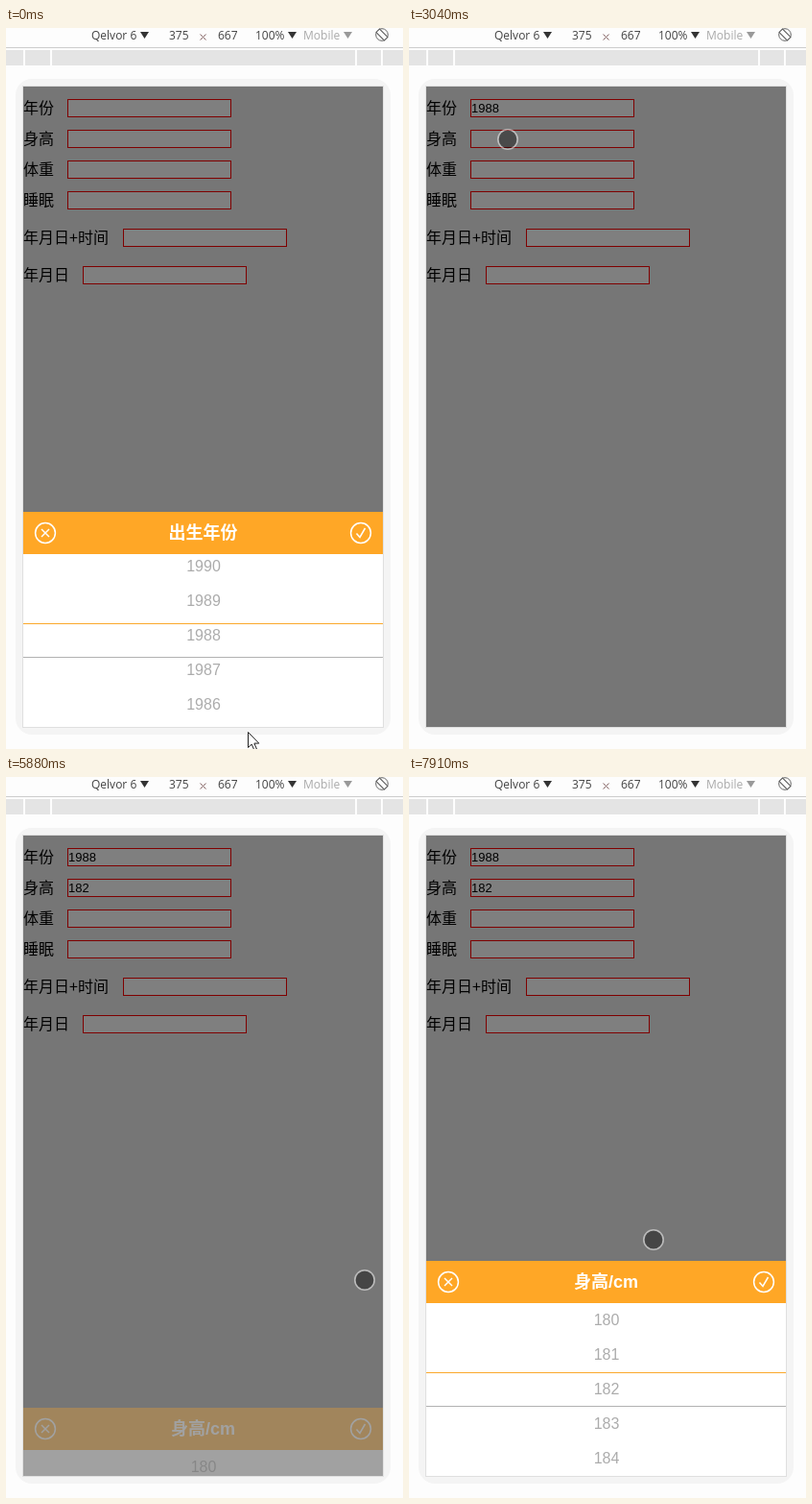
These frames come from a looping animation (414 by 751 pixels, 8 s). An HTML page with a canvas:

```html
<!DOCTYPE html>
<html lang="zh">
<head>
<meta charset="utf-8">
<style>
html, body { margin: 0; width: 100%; height: 100%; overflow: hidden; background: #fdfdfd; }
canvas { display: block; }
</style>
</head>
<body>
<canvas id="stage" width="414" height="751"></canvas>
<script>
const LOOP = 8000;
const stage = document.getElementById('stage').getContext('2d');
const sheetCanvas = document.createElement('canvas');
sheetCanvas.width = 375;
sheetCanvas.height = 224;
const sheet = sheetCanvas.getContext('2d');

const SCREEN = { x: 18, y: 61, w: 375, h: 667 };
const CJK = '"Noto Sans CJK SC", "Noto Sans CJK", sans-serif';
const ARIAL = '"Liberation Sans", "Noto Sans CJK SC", "Noto Sans CJK", sans-serif';
const UI = '"Open Sans", "Noto Sans", sans-serif';

// The picture is held between redraws: [first, last, count]
const BURSTS = [
  [0, 0, 1], [150, 1110, 8], [1230, 1230, 1], [1540, 1660, 2], [1940, 2600, 6],
  [2910, 3870, 8], [4020, 4920, 7], [5070, 6000, 8], [6160, 7000, 7], [7400, 7910, 5]
];
const TICKS = BURSTS.flatMap(([a, b, n]) =>
  Array.from({ length: n }, (_, i) => n > 1 ? Math.round(a + (b - a) * i / (n - 1)) : a));

const POINTER = [
  [0, 252, 733], [420, 292, 676], [830, 362, 575], [1110, 394, 530], [1230, 382, 530],
  [1540, 374, 525], [1660, 373, 524], [1940, 373, 524], [2330, 190, 240], [2600, 103, 116],
  [3180, 103, 116], [3500, 215, 440], [3870, 258, 582], [4320, 260, 590], [4920, 257, 581],
  [5070, 270, 572], [5470, 365, 528], [5600, 374, 524], [6000, 374, 524], [6440, 245, 300],
  [6720, 112, 110], [7000, 108, 121], [7527, 108, 121], [7910, 255, 482]
];
const WHEEL = [[0, -5], [150, -4], [420, 0], [3870, 0], [4320, 8], [4920, -1], [5200, 0]];
const SHOWN = [
  [0, 1], [1800, 1], [1940, 0.75], [2072, 0.25], [2204, 0], [2910, 0], [3040, 0.07],
  [3184, 0.6], [3321, 0.95], [3400, 1], [5660, 1], [5734, 0.9], [5873, 0.29], [6000, 0],
  [7400, 0], [7527, 0.07], [7655, 0.6], [7782, 0.97], [7850, 1]
];

const FIELDS = [
  ['年份', 64, 74], ['身高', 64, 106], ['体重', 64, 138], ['睡眠', 64, 170],
  ['年月日+时间', 122, 209], ['年月日', 80, 248]
];

function track(keys, t, col = 1) {
  const i = keys.findIndex(k => k[0] > t);
  if (i < 0) return keys[keys.length - 1][col];
  const a = keys[i - 1], b = keys[i];
  return a[col] + (b[col] - a[col]) * (t - a[0]) / (b[0] - a[0]);
}

function rect(c, color, x, y, w, h) {
  c.fillStyle = color;
  c.fillRect(x, y, w, h);
}

function text(c, str, x, y, font, color, align = 'left') {
  c.font = font;
  c.fillStyle = color;
  c.textAlign = align;
  c.fillText(str, x, y);
}

function line(c, points, color, width) {
  c.beginPath();
  points.forEach(([x, y]) => c.lineTo(x, y));
  c.strokeStyle = color;
  c.lineWidth = width;
  c.stroke();
}

function ring(c, x, y, r, color, width) {
  c.beginPath();
  c.arc(x, y, r, 0, Math.PI * 2);
  c.strokeStyle = color;
  c.lineWidth = width;
  c.stroke();
}

function polygon(c, points, color) {
  c.beginPath();
  points.forEach(([x, y]) => c.lineTo(x, y));
  c.closePath();
  c.fillStyle = color;
  c.fill();
}

const caret = (x, color) => polygon(stage, [[x, 4], [x + 9, 4], [x + 4.5, 11]], color);

function drawToolbar() {
  rect(stage, '#fdfdfd', 0, 0, 414, 751);
  const font = '12px ' + UI;
  text(stage, 'Qelvor 6', 89, 12, font, '#444');
  text(stage, '375', 170, 12, font, '#444');
  text(stage, '667', 221, 12, font, '#444');
  text(stage, '100%', 260, 12, font, '#444');
  text(stage, 'Mobile', 310, 12, font, '#aaa');
  line(stage, [[202.5, 6.5], [208.5, 12.5]], '#856565', 1);
  line(stage, [[208.5, 6.5], [202.5, 12.5]], '#856565', 1);
  caret(140, '#333');
  caret(294, '#333');
  caret(352, '#999');

  ring(stage, 392, 7, 6.3, '#666', 1);
  stage.save();
  stage.translate(392, 7);
  stage.rotate(-Math.PI / 4);
  rect(stage, '#fdfdfd', -3, -7, 6, 14);
  stage.strokeStyle = '#555';
  stage.lineWidth = 1;
  stage.strokeRect(-2.5, -6, 5, 12);
  stage.restore();

  rect(stage, '#cdcdcd', 0, 20, 414, 1);
  [[0, 18], [20, 46], [48, 364], [366, 391], [393, 414]]
    .forEach(([a, b]) => rect(stage, '#e4e4e4', a, 23, b - a, 16));
}

function drawPage(t) {
  stage.beginPath();
  stage.roundRect(10, 53, 391, 683, 17);
  stage.fillStyle = '#f4f4f4';
  stage.fill();
  rect(stage, '#dfdfdf', 17, 60, 377, 669);
  rect(stage, '#eee', SCREEN.x, SCREEN.y, SCREEN.w, SCREEN.h);

  FIELDS.forEach(([label, x, y]) => {
    text(stage, label, 18, y + 15, '16px ' + CJK, '#000');
    rect(stage, '#f00', x, y, 171, 19);
    rect(stage, '#fff', x + 1, y + 1, 169, 17);
  });
  if (t >= 1940) text(stage, '1988', 65, 88, '13px ' + ARIAL, '#000');
  if (t >= 5734) text(stage, '182', 65, 120, '13px ' + ARIAL, '#000');
}

function drawSheet(t) {
  const years = t < 2700;
  const title = years ? '出生年份' : '身高/cm';
  const offset = track(WHEEL, t);
  rect(sheet, '#fff', 0, 0, 375, 224);
  for (let row = -1; row <= 5; row++) {
    const value = years ? 1990 - row : 180 + row;
    text(sheet, value, 188, 67 + row * 36 + offset, '16px ' + ARIAL, '#acacac', 'center');
  }
  rect(sheet, '#ffa726', 0, 0, 375, 44);
  text(sheet, title, 187.5, 28, 'bold 18px ' + ARIAL, '#fff', 'center');
  rect(sheet, '#fba92c', 0, 116, 375, 1);
  rect(sheet, '#b2b2b2', 0, 151, 375, 1);

  ring(sheet, 23, 22, 10.4, '#fff', 1.5);
  line(sheet, [[19, 18], [27, 26]], '#fff', 1.5);
  line(sheet, [[27, 18], [19, 26]], '#fff', 1.5);
  ring(sheet, 352, 22, 10.4, '#fff', 1.5);
  line(sheet, [[347.5, 22.5], [351, 26.5], [356.5, 17]], '#fff', 1.5);
}

function drawPicker(t) {
  const open = t < 2204 || (t >= 2910 && t < 6000) || t >= 7400;
  if (!open) return;
  const shown = track(SHOWN, t);
  drawSheet(t);
  stage.save();
  stage.beginPath();
  stage.rect(SCREEN.x, SCREEN.y, SCREEN.w, SCREEN.h);
  stage.clip();
  rect(stage, 'rgba(0,0,0,.5)', SCREEN.x, SCREEN.y, SCREEN.w, SCREEN.h);
  stage.globalAlpha = shown;
  stage.drawImage(sheetCanvas, SCREEN.x, Math.round(504 + 224 * (1 - shown)));
  stage.restore();
}

function drawPointer(t) {
  const x = Math.round(track(POINTER, t, 1));
  const y = Math.round(track(POINTER, t, 2));
  if (x > 393 || y > 728) {
    const shape = [[0, 0], [0, 16], [3.7, 12.6], [6.3, 18.5], [8.9, 17.4], [6.4, 11.6], [11.3, 11.6]]
      .map(([dx, dy]) => [x + 0.5 + dx, y + 0.5 + dy]);
    polygon(stage, shape, '#fff');
    line(stage, [...shape, shape[0]], '#222', 1);
    return;
  }
  stage.beginPath();
  stage.arc(x, y, 9.5, 0, Math.PI * 2);
  stage.fillStyle = 'rgba(0,0,0,.41)';
  stage.fill();
  ring(stage, x, y, 10.2, 'rgba(255,255,255,.5)', 1.6);
}

function draw(now) {
  const time = now % LOOP;
  const t = TICKS.filter(tick => tick <= time).pop();
  drawToolbar();
  drawPage(t);
  drawPicker(t);
  drawPointer(t);
  requestAnimationFrame(draw);
}

const start = performance.now();
const loop = () => draw(Math.max(0, performance.now() - start));
function tick() {
  loop();
}
draw = (original => function () { original(Math.max(0, performance.now() - start)); })(draw);
tick();
</script>
</body>
</html>
```
